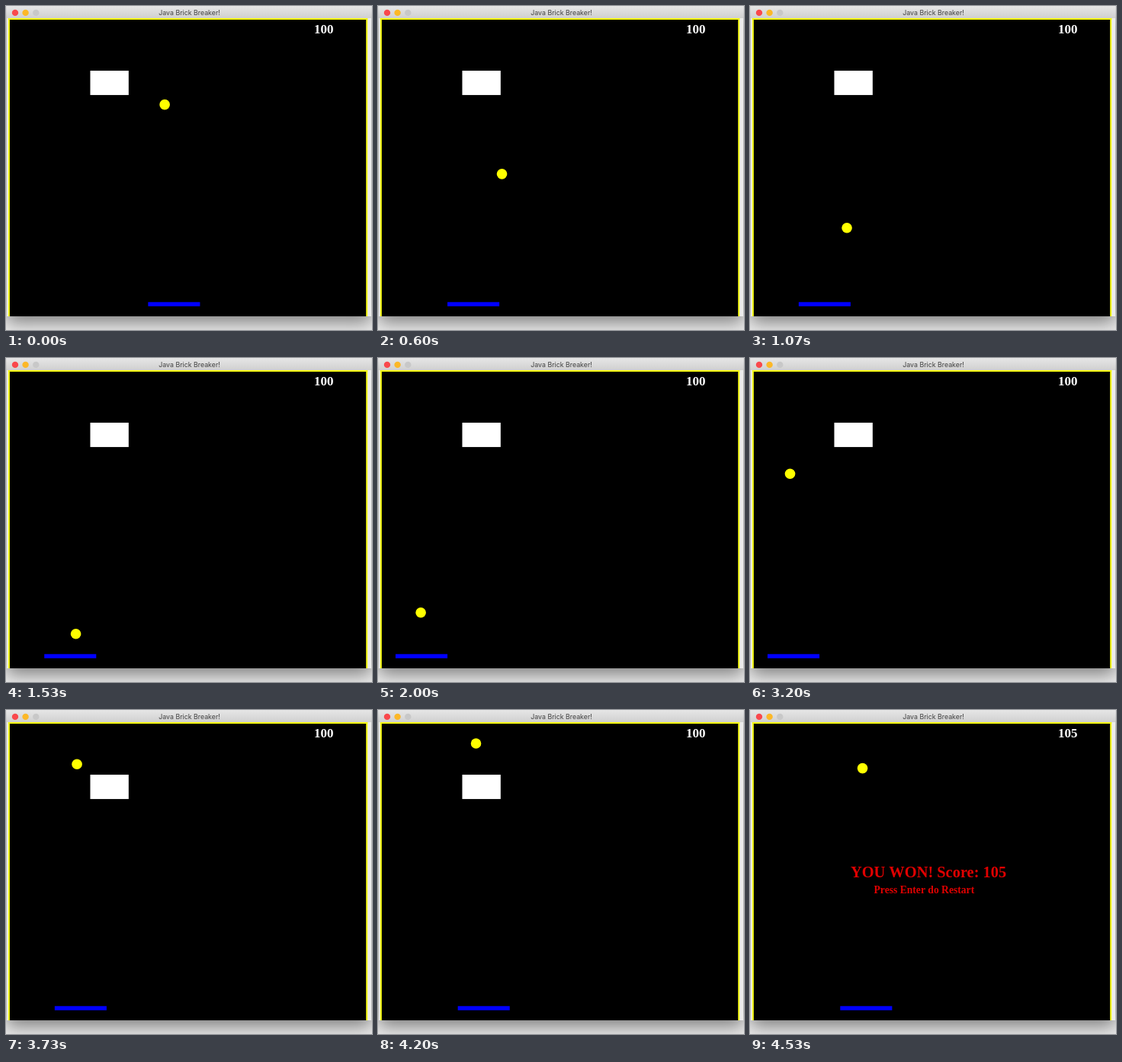
These frames come from a looping animation (480x426 px, 4990 ms). An HTML page with a canvas:

```html
<!DOCTYPE html>
<html lang="en">
<head>
<meta charset="utf-8">
<title>Java Brick Breaker!</title>
<style>
  html, body { margin: 0; width: 100%; height: 100%; overflow: hidden; background: #ececec; }
  canvas { display: block; }
</style>
</head>
<body>
<canvas id="stage" width="480" height="426"></canvas>
<script>
const ctx = document.getElementById('stage').getContext('2d');
const LOOP = 4990, FPS = 15, LAST = 68, WIN = 67;
const TICKS = 7.445; // game ticks per picture

// Game units to stage pixels
const UNIT = 0.6806, LEFT = 2.6, TOP = 16;
const px = u => LEFT + u * UNIT;
const py = u => TOP + u * UNIT;

// Turning points as [tick, position in game units]
const ballX = [[0, 292], [293, -1], [497, 203]];
const ballY = [[0, 157], [187, 531], [453, -1], [494, 81], [495, 79]];

// Key presses in ms; each moves the paddle by 20 units
const leftKeys = [...Array.from({ length: 9 }, (_, i) => 65 + i * 86), 1400, 1850, 1940];
const rightKeys = Array.from({ length: 7 }, (_, i) => 3300 + i * 175);

function along(path, tick) {
  for (let i = 1; i < path.length; i++) {
    const [a, from] = path[i - 1], [b, to] = path[i];
    if (tick <= b) return from + (to - from) * (tick - a) / (b - a);
  }
  return path[path.length - 1][1];
}

function rect(color, x, y, w, h) {
  ctx.fillStyle = color;
  ctx.fillRect(px(x), py(y), w * UNIT, h * UNIT);
}

function dot(color, x, y, r) {
  ctx.fillStyle = color;
  ctx.beginPath();
  ctx.arc(x, y, r, 0, Math.PI * 2);
  ctx.fill();
}

function label(text, color, size, x, y) {
  ctx.fillStyle = color;
  ctx.font = `bold ${size * UNIT}px "Liberation Serif", serif`;
  ctx.textAlign = 'left';
  ctx.fillText(text, px(x), py(y));
}

function drawWindow() {
  ctx.fillStyle = '#ececec';
  ctx.fillRect(0, 0, 480, 426);
  ctx.save();
  ctx.shadowColor = 'rgba(0, 0, 0, 0.47)';
  ctx.shadowBlur = 22;
  ctx.shadowOffsetY = 8;
  ctx.fillRect(1, 0, 478, 408);
  ctx.restore();

  const bar = ctx.createLinearGradient(0, 0, 0, TOP);
  bar.addColorStop(0, '#e6e6e6');
  bar.addColorStop(1, '#d0d0d0');
  ctx.fillStyle = bar;
  ctx.fillRect(1, 0, 478, TOP);
  dot('#f9484c', 12, 8.9, 4.2);
  dot('#fcb827', 25.6, 8.9, 4.2);
  dot('#c8c8c8', 39.3, 8.9, 4.2);

  ctx.fillStyle = '#404040';
  ctx.font = '8.8px Inter, sans-serif';
  ctx.textAlign = 'center';
  ctx.fillText('Java Brick Breaker!', 240.5, 12.2);
}

function drawGame(n) {
  const won = n >= WIN;
  const ms = n * 1000 / FPS;
  const tick = n * TICKS;
  const pressed = keys => keys.filter(k => k <= ms).length;
  const paddle = 270 + 20 * (pressed(rightKeys) - pressed(leftKeys));
  const border = '#f6fa14';

  ctx.save();
  ctx.beginPath();
  ctx.rect(1, TOP, 478, 408 - TOP);
  ctx.clip();
  rect('#000', 1, 1, 690, 592);
  if (!won) rect('#fff', 158.5, 101.5, 74, 47);
  rect(border, 0.4, 0, 3, 592);
  rect(border, 0.4, 0, 692.6, 3);
  rect(border, 690, 0, 3, 592);
  label(won ? '105' : '100', '#fff', 25, 589.6, 30);
  rect('#00f', paddle, 548.5, 100, 8);
  dot('#ff0', px(along(ballX, tick) + 10), py(along(ballY, tick) + 10), 10 * UNIT);
  if (won) {
    label('YOU WON! Score: 105', '#e00000', 30, 190, 300);
    label('Press Enter do Restart', '#e00000', 20, 235, 330);
  }
  ctx.restore();
}

let start;
function animate(now) {
  start ??= now;
  const t = Math.floor(((now - start) % LOOP) / 10) * 10;
  drawWindow();
  drawGame(Math.min(LAST, Math.floor((t + 4) * FPS / 1000)));
  requestAnimationFrame(animate);
}
requestAnimationFrame(animate);
</script>
</body>
</html>
```
